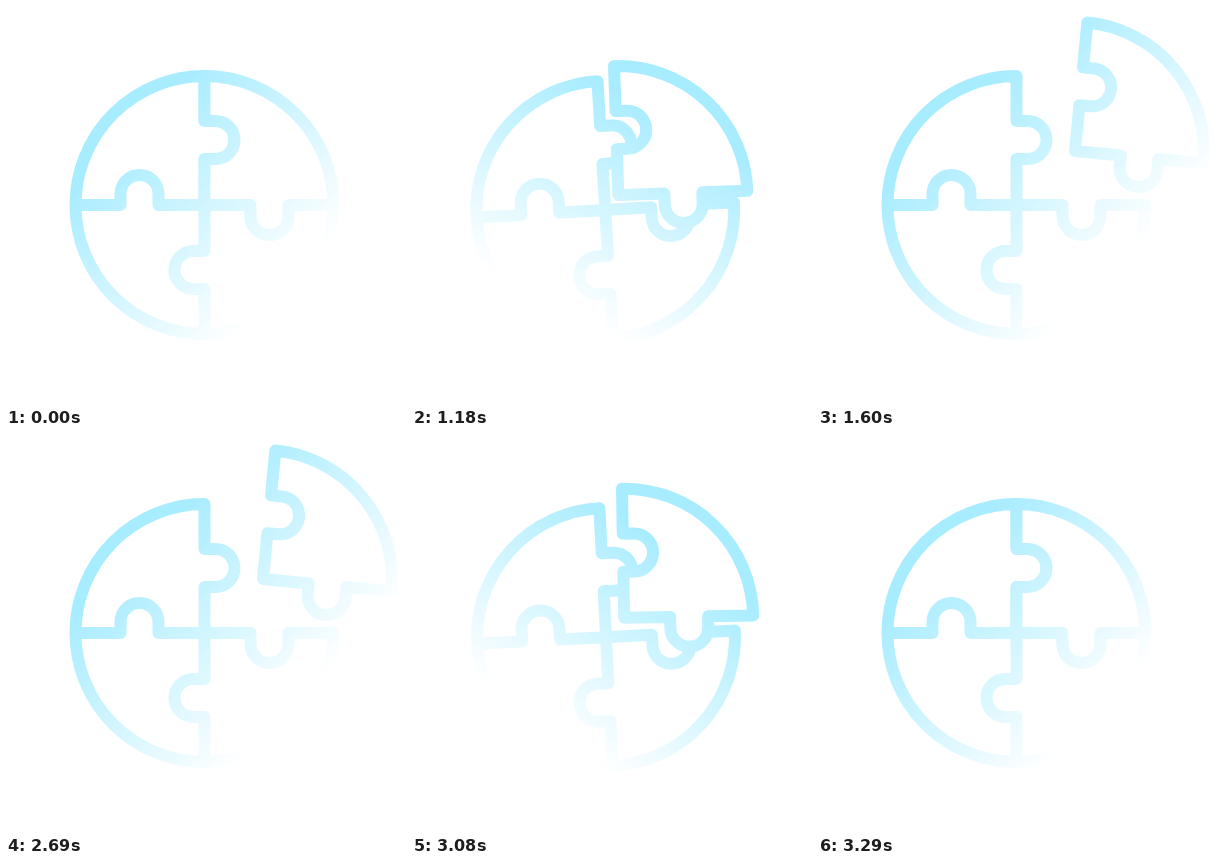
Recreate the animation shown at these times as an HTML page with a canvas. Size 400 by 400 pixels, loop 3320 ms.

```html
<!DOCTYPE html>
<html lang="en">
<head>
<meta charset="utf-8">
<title>Puzzle circle</title>
<style>
html, body { margin: 0; width: 100%; height: 100%; overflow: hidden; background: #fff; }
canvas { display: block; width: 400px; height: 400px; }
</style>
</head>
<body>
<canvas id="stage" width="400" height="400"></canvas>
<script>
const ctx = document.getElementById('stage').getContext('2d');
const LOOP = 3320, STEP = 30, STEPS = 20;
const OPEN = 1000, CLOSE = 2690;
const CX = 198.5, CY = 199, R = 129;
const KNOB = { at: 65, side: 11, r: 19 };
const QUARTER = Math.PI / 2, DEG = Math.PI / 180;

// Progress in whole steps: 0 is closed, STEPS is fully open.
function stepAt(t) {
  if (t >= CLOSE) return Math.max(0, STEPS - Math.floor((t - CLOSE) / STEP));
  return Math.min(STEPS, Math.max(0, Math.floor((t - OPEN) / STEP)));
}

// Quick recoil of the whole disc that dies away.
function recoil(n) {
  if (n <= 0 || n >= 18) return 0;
  const u = n / 3.6;
  return Math.pow(u * Math.exp(1 - u), 1.3);
}

function edgeOut() {
  const { at, side, r } = KNOB;
  ctx.lineTo(0, 0);
  ctx.lineTo(at - r, 0);
  ctx.arc(at, side, r, Math.PI, 0, true);
  ctx.lineTo(at + r, 0);
  ctx.lineTo(R, 0);
}

function edgeIn() {
  const { at, side, r } = KNOB;
  ctx.lineTo(R, 0);
  ctx.lineTo(at + r, 0);
  ctx.arc(at, side, r, 0, Math.PI);
  ctx.lineTo(at - r, 0);
  ctx.lineTo(0, 0);
}

function place(x, y, deg) {
  ctx.setTransform(1, 0, 0, 1, CX + x, CY + y);
  ctx.rotate(deg * DEG);
}

function bodyPath() {
  ctx.beginPath();
  ctx.arc(0, 0, R, 0, 3 * QUARTER);
  for (let i = 0; i < 4; i++) {
    ctx.moveTo(0, 0);
    edgeOut();
    ctx.rotate(QUARTER);
  }
}

function piecePath() {
  ctx.beginPath();
  ctx.rotate(-QUARTER);
  edgeIn();
  ctx.rotate(QUARTER);
  edgeOut();
  ctx.arc(0, 0, R, 0, -QUARTER, true);
  ctx.closePath();
}

function strokeWith(paint) {
  ctx.setTransform(1, 0, 0, 1, 0, 0);
  ctx.strokeStyle = paint;
  ctx.stroke();
}

function gradientAt(n) {
  const a = (45 + 90 * Math.sin(Math.PI * n / STEPS)) * DEG;
  const dx = Math.cos(a), dy = Math.sin(a);
  const g = ctx.createLinearGradient(CX - 105 * dx, CY - 105 * dy, CX + 115 * dx, CY + 115 * dy);
  g.addColorStop(0, '#a8ecff');
  g.addColorStop(1, '#ffffff');
  return g;
}

function draw(t) {
  const n = stepAt(t), k = recoil(n), paint = gradientAt(n);
  const x = -6.5 * k, y = 6 * k, turn = -4.2 * k;
  const s = Math.sin(QUARTER * Math.max(0, (n - 3) / (STEPS - 3)));

  ctx.setTransform(1, 0, 0, 1, 0, 0);
  ctx.fillStyle = '#fff';
  ctx.fillRect(0, 0, 400, 400);
  ctx.lineWidth = 12;
  ctx.lineCap = ctx.lineJoin = 'round';

  place(x, y, turn);
  bodyPath();
  strokeWith(paint);

  place(x + 58.5 * Math.pow(s, 1.15), y - 54 * s, turn + 5.5 * s);
  piecePath();
  ctx.fill();
  strokeWith(paint);
}

const start = performance.now();
function tick() {
  draw((performance.now() - start) % LOOP);
  requestAnimationFrame(tick);
}
tick();
</script>
</body>
</html>
```
